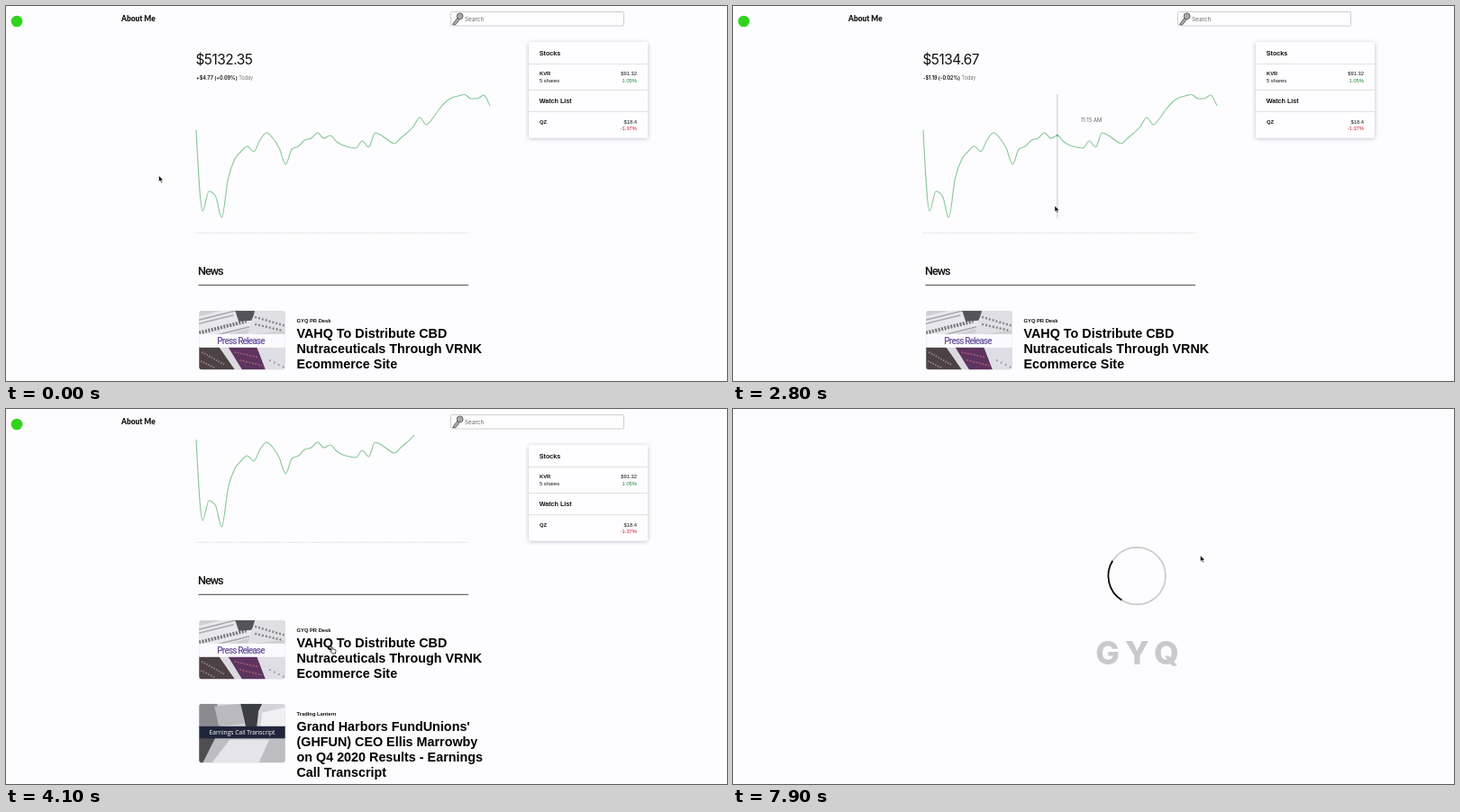
These frames come from a looping animation (800 by 417 pixels, 8000 ms). An HTML page:

```html
<!DOCTYPE html>
<html lang="en">
<head>
<meta charset="utf-8">
<title>Portfolio dashboard</title>
<style>
  html, body { margin: 0; width: 100%; height: 100%; overflow: hidden; background: #fdfcfe; }
  svg { display: block; width: 100vw; height: 100vh; }
  text { font-family: "Liberation Sans", Arial, sans-serif; fill: #111; white-space: pre; }
  .b { font-weight: 700; }
  .inter { font-family: Inter, sans-serif; }
  .small { font-size: 5.8px; }
  .head { font-size: 7.2px; font-weight: 700; }
  .title { font-size: 14.35px; font-weight: 700; fill: #000; }
  .narrow { font-family: Roboto, sans-serif; font-stretch: 75%; font-weight: 500; }
  .end { text-anchor: end; }
  .mid { text-anchor: middle; }
</style>
</head>
<body>
<svg viewBox="0 0 800 417" preserveAspectRatio="none">
  <defs>
    <clipPath id="thumb"><rect width="95.5" height="65.5" rx="3"/></clipPath>
    <clipPath id="below"><rect y="29" width="800" height="388"/></clipPath>
    <filter id="shadow" x="-10%" y="-10%" width="120%" height="120%">
      <feDropShadow dx="0" dy="1" stdDeviation="2.5" flood-color="#000" flood-opacity=".24"/>
    </filter>
    <linearGradient id="wipe" gradientUnits="userSpaceOnUse" y1="0" y2="0">
      <stop offset="0" stop-color="#d4007f"/><stop offset="1" stop-color="#c9c9cb"/>
    </linearGradient>
  </defs>

  <g id="page">
    <g clip-path="url(#below)"><g id="scroll">
      <text id="price" class="inter" x="210.5" y="65" font-size="15.4" letter-spacing="-.5"></text>
      <text class="inter" x="211" y="82" font-size="5.6" letter-spacing="-.06"><tspan id="delta" font-weight="600"></tspan><tspan fill="#777"> Today</tspan></text>
      <path id="curve" fill="none" stroke="#86c899" stroke-width="1.1"/>
      <g id="hover">
        <path id="rule" stroke="#c8c8ca" d="M0 98V236"/>
        <circle id="dot" r="1.3" fill="#5fb878"/>
        <text id="clock" class="inter" y="129" font-size="5.9" style="fill:#666"></text>
      </g>
      <path d="M211 252.3H513" stroke="#c6c6c8" stroke-width=".7" stroke-dasharray="1 .7"/>
      <text class="narrow" x="213" y="299" font-size="12.6" letter-spacing="-1">News</text>
      <path d="M213.5 310.3H513" stroke="#333" stroke-width=".9"/>

      <g transform="translate(214.2 338.8)" clip-path="url(#thumb)">
        <rect width="96" height="66" fill="#cfced3"/>
        <g transform="rotate(-14)">
          <path d="M-6 6H55V33H-6Z" fill="#e8e7eb"/>
          <path d="M-3 10H40M-4 14H36M-5 31H50" stroke="#aaa8af" stroke-width="1.6"/>
          <path d="M-6 24H48" stroke="#77757d" stroke-width="4" stroke-dasharray="2 1.5"/>
        </g>
        <path d="M40 0H64L58 11L44 12Z" fill="#55545a"/>
        <path d="M62 0H96V22L54 27Z" fill="#e0dfe4"/>
        <path d="M62 7L96 17M62 15L92 22" stroke="#85838c" stroke-width="2.4" stroke-dasharray="2 2"/>
        <path d="M0 40H22L40 66H0Z" fill="#4c4144"/>
        <path d="M3 46L28 60M2 56L18 64" stroke="#94807f" stroke-width="2" stroke-dasharray="1.5 1.5"/>
        <path d="M22 40H36L52 66H40Z" fill="#dcd9e0"/>
        <path d="M32 40H64L74 66H48Z" fill="#5d345f"/>
        <path d="M39 46L66 52M45 55L70 61" stroke="#a35a76" stroke-width="1.6" stroke-dasharray="2 1.5"/>
        <path d="M64 40H96V66H74Z" fill="#dfdde5"/>
        <path d="M78 55L96 64" stroke="#8d8b95" stroke-width="2" stroke-dasharray="1.5 4"/>
        <rect y="26" width="96" height="15" fill="#fbfafd"/>
        <text class="narrow mid" x="46.3" y="37.2" font-size="10" letter-spacing="-.85" style="fill:#6b559c">Press Release</text>
      </g>
      <text class="small b" x="322.5" y="351.7">GYQ PR Desk</text>
      <text class="title" y="369.4"><tspan x="322.5">VAHQ To Distribute CBD</tspan><tspan x="322.5" dy="16.8">Nutraceuticals Through VRNK</tspan><tspan x="322.5" dy="16.8">Ecommerce Site</tspan></text>

      <g transform="translate(214.2 431.8)" clip-path="url(#thumb)">
        <rect width="96" height="66" fill="#d4d4d8"/>
        <path d="M0 0H20L24 26H0Z" fill="#8a8a8f"/>
        <path d="M17 3L46 0L50 22L22 25Z" fill="#b9b9be"/>
        <path d="M46 0H70L66 8L64 26H52Z" fill="#3d3e43"/>
        <path d="M70 10L96 4V26H68Z" fill="#f0eff2"/>
        <path d="M0 38H96V66H0Z" fill="#bdbdc2"/>
        <path d="M14 66L34 40H78L66 66Z" fill="#e6e5e9"/>
        <path d="M0 38H18L4 66H0Z" fill="#4d4d52"/>
        <rect y="25" width="96" height="13.5" fill="#20263a"/>
        <text class="mid" x="47.8" y="34.2" font-size="6.7" style="font-family:'Open Sans',sans-serif;fill:#fff">Earnings Call Transcript</text>
      </g>
      <text class="small b" x="322.5" y="444.7">Trading Lantern</text>
      <text class="title" y="462.4"><tspan x="322.5">Grand Harbors FundUnions'</tspan><tspan x="322.5" dy="16.8">(GHFUN) CEO Ellis Marrowby</tspan><tspan x="322.5" dy="16.8">on Q4 2020 Results - Earnings</tspan><tspan x="322.5" dy="16.8">Call Transcript</tspan></text>
    </g></g>

    <circle cx="12" cy="17" r="6.3" fill="#2fd41c"/>
    <text x="128" y="17" font-size="8.3" font-weight="900" style="font-family:Lato,sans-serif">About Me</text>
    <rect x="493.5" y="6.5" width="192" height="15.5" rx="1" fill="#fefdff" stroke="#c9c9cb" stroke-width=".9"/>
    <g fill="#aaa" stroke="#555" stroke-width=".9">
      <path d="M501 13L495.5 20.5L498.5 21L503 15.5Z"/><circle cx="503.7" cy="11.3" r="3.4"/>
    </g>
    <text class="inter" x="509" y="16.8" font-size="6.4" style="fill:#666">Search</text>

    <rect x="580" y="40" width="132" height="106.5" rx="2" fill="#fefdff" filter="url(#shadow)"/>
    <path d="M580 64.5H712M580 93.5H712M580 117.5H712" stroke="#dedde0" stroke-width=".9"/>
    <text class="head" x="591.7" y="54.6">Stocks</text>
    <text class="head" x="591.7" y="108.4">Watch List</text>
    <text class="small b" x="592" y="77">KVR</text>
    <text class="small" x="592" y="84.6">5 shares</text>
    <text class="small end" x="700" y="77">$91.32</text>
    <text class="small end" x="700" y="84.6" style="fill:#138a2c">1.05%</text>
    <text class="small b" x="592" y="130.8">QZ</text>
    <text class="small end" x="700" y="130.8">$18.4</text>
    <text class="small end" x="700" y="138.4" style="fill:#d8142a">-1.37%</text>
  </g>

  <g id="loader" fill="none" stroke-width="1.7">
    <circle cx="448.2" cy="185.6" r="31.8" stroke="#cbcbcd"/>
    <circle id="arc" cx="448.2" cy="185.6" r="31.8" stroke="#050505" pathLength="4" stroke-dasharray="1 3"/>
    <text class="inter mid" x="452" y="284" font-size="35.5" font-weight="800" letter-spacing="7" style="fill:url(#wipe)">GYQ</text>
  </g>

  <g id="cursor" stroke="#fff" stroke-width=".6">
    <path id="arrow" fill="#000" d="M0 0V7L1.6 5.6L2.7 8.2L3.9 7.6L2.8 5.2H5Z"/>
    <path id="hand" fill="#fff" stroke="#111" stroke-width=".8" d="M-.4 .7Q.6 -.2 1.2 1L1.7 3L4.3 3.6Q5.3 4 5 5.2L4.4 8H1.2L-1.3 5Q-1 4 .3 4.8Z"/>
  </g>
</svg>

<script>
const $ = id => document.getElementById(id);
const LOOP = 8000, STEP = 100;

const chart = { x0: 211, dx: 7.09, top: 95, bottom: 240 };
const levels = [138, 228, 206, 211, 235, 192, 171, 162, 156, 162, 149, 141, 147, 158, 176, 159,
  156, 149, 147, 141, 147.1, 144, 151, 155, 157, 158, 150, 157, 141, 144, 149, 153, 147, 141,
  134, 124, 132, 125, 115, 107, 102, 100, 98.5, 103, 103, 99, 111];
const last = levels.length - 1;
const pointX = i => chart.x0 + i * chart.dx;

// Keys: time, then one or more values
const cursorKeys = [[0, 169.5, 188.5], [400, 262, 180], [900, 440, 188], [1200, 484, 196],
  [1800, 312, 205], [2000, 304, 204.5], [2200, 304, 204.5], [2600, 409, 200], [2800, 357, 222],
  [2900, 354, 237], [3100, 361.5, 263.2], [3800, 361.5, 264.5], [4100, 361, 264],
  [4500, 279, 227.7], [4800, 279, 227.7], [5100, 286.5, 225.7], [5200, 286.5, 225.7],
  [5500, 293, 225.7], [6000, 293, 225.7], [6300, 564, 103], [6500, 541, 145.7], [6800, 518.5, 162.7]];
const scrollKeys = [[3100, 0], [3200, 3], [3300, 13], [3800, 74], [4000, 98], [4300, 116]];
const wipeKeys = [[6200, 330], [6500, 460], [6700, 500], [7100, 500], [7800, 330]];

function at(keys, t) {
  const n = keys.findIndex(k => k[0] > t);
  if (n === 0) return keys[0].slice(1);
  if (n < 0) return keys[keys.length - 1].slice(1);
  const [a, b] = [keys[n - 1], keys[n]], u = (t - a[0]) / (b[0] - a[0]);
  return a.slice(1).map((v, i) => v + (b[i + 1] - v) * u);
}

// Monotone cubic through evenly spaced points
function curvePath(ys) {
  const rise = ys.slice(1).map((y, i) => y - ys[i]);
  const slope = ys.map((_, i) => {
    const a = rise[i - 1], b = rise[i];
    if (a === undefined) return b * 1.5;
    if (b === undefined) return a;
    return (Math.sign(a) + Math.sign(b)) * Math.min(Math.abs(a), Math.abs(b), Math.abs(a + b) / 4);
  });
  return rise.reduce((d, _, i) => d + `C${pointX(i + 1 / 3)} ${ys[i] + slope[i] / 3} ` +
    `${pointX(i + 2 / 3)} ${ys[i + 1] - slope[i + 1] / 3} ${pointX(i + 1)} ${ys[i + 1]}`,
    `M${pointX(0)} ${ys[0]}`);
}

const OPEN = 5135.86;
const gain = i => (levels[0] - levels[i]) * 0.199;
const signed = (v, unit) => (v < 0 ? '-' : '+') + unit + Math.abs(v).toFixed(2);

function clockText(i) {
  const min = 570 + i * 5, h = Math.floor(min / 60);
  return `${(h + 11) % 12 + 1}:${String(min % 60).padStart(2, '0')} ${h < 12 ? 'AM' : 'PM'}`;
}

const show = (id, on) => $(id).setAttribute('display', on ? 'inline' : 'none');

function drawDashboard(t, x, y) {
  $('scroll').setAttribute('transform', `translate(0 ${-at(scrollKeys, t)[0]})`);
  const hovering = t < 3000 && x > chart.x0 - 3 && x < pointX(last) + 3 && y > chart.top && y < chart.bottom;
  const i = Math.max(0, Math.min(last, Math.round((x - chart.x0) / chart.dx)));
  const shownPrice = hovering ? OPEN + gain(i) : t < 2000 ? 5132.35 : OPEN + gain(20);
  const change = hovering ? gain(i) : 4.77;
  $('price').textContent = '$' + shownPrice.toFixed(2);
  $('delta').textContent = `${signed(change, '$')} (${signed(change / OPEN * 100, '')}%)`;
  show('hover', hovering);
  if (!hovering) return;
  const px = pointX(i);
  $('rule').setAttribute('transform', `translate(${px} 0)`);
  $('dot').setAttribute('cx', px);
  $('dot').setAttribute('cy', levels[i]);
  $('clock').setAttribute('x', px + 26);
  $('clock').textContent = clockText(i);
}

function drawLoader(t) {
  const angle = 146 + (t - 6500) / 477.3 * 360;
  $('arc').setAttribute('transform', `rotate(${angle} 448.2 185.6)`);
  const [edge] = at(wipeKeys, t);
  $('wipe').setAttribute('x1', edge);
  $('wipe').setAttribute('x2', edge + 75);
}

function draw(now) {
  const t = Math.floor(now % LOOP / STEP) * STEP;
  const [x, y] = at(cursorKeys, t);
  const pageOn = t < 4600, pointing = t >= 3600 && pageOn;
  show('page', pageOn);
  show('loader', t >= 6200);
  show('hand', pointing);
  show('arrow', !pointing);
  $('cursor').setAttribute('transform', `translate(${x} ${y})`);
  if (pageOn) drawDashboard(t, x, y);
  else drawLoader(t);
}

$('curve').setAttribute('d', curvePath(levels));
const start = performance.now();
function tick() {
  draw(performance.now() - start);
  requestAnimationFrame(tick);
}
tick();
</script>
</body>
</html>
```
